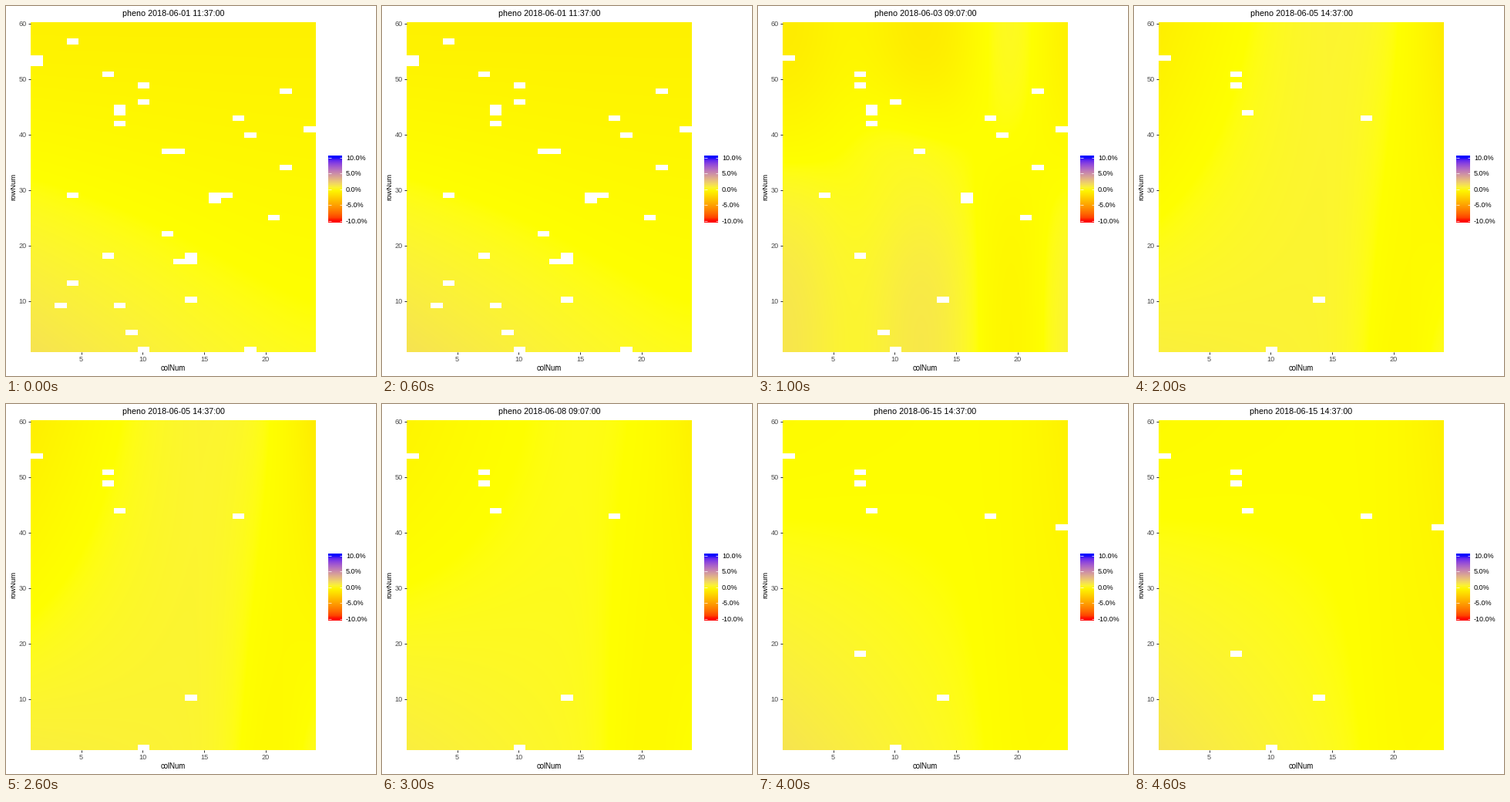
A matplotlib script that plays this animation: 480x480 px, repeating every 5000 ms.

```python
import numpy as np
import matplotlib.pyplot as plt
from matplotlib.animation import FuncAnimation

SIZE, DPI = 480, 100
LEFT, TOP, RIGHT, BOTTOM = 32, 21, 402, 449
COLS, ROWS = 24, 60
LIMIT = 10.5

plt.rcParams["font.family"] = "Liberation Sans"

# Red, yellow and blue in CIELAB; yellow sits at zero.
LAB_STOPS = np.array([[53.24, 80.09, 67.20],
                      [97.14, -21.55, 94.48],
                      [32.30, 79.19, -107.86]])
WHITE = np.array([0.9505, 1.0, 1.089])
XYZ_TO_RGB = np.array([[3.2406, -1.5372, -0.4986],
                       [-0.9689, 1.8758, 0.0415],
                       [0.0557, -0.2040, 1.0570]])


def lab_to_rgb(lab):
    fy = (lab[..., 0] + 16) / 116
    f = np.stack([fy + lab[..., 1] / 500, fy, fy - lab[..., 2] / 200], -1)
    xyz = WHITE * np.where(f > 6 / 29, f ** 3, (f - 4 / 29) * 108 / 841)
    lin = np.clip(xyz @ XYZ_TO_RGB.T, 0, 1)
    return np.clip(np.where(lin > 0.0031308,
                            1.055 * lin ** (1 / 2.4) - 0.055,
                            12.92 * lin), 0, 1)


def colour(percent):
    stops = [-LIMIT, 0, LIMIT]
    return lab_to_rgb(np.stack(
        [np.interp(percent, stops, LAB_STOPS[:, k]) for k in range(3)], -1))


# Pixel centres, and the field position: u runs rightwards, v upwards
X = np.arange(LEFT, RIGHT) + 0.5
Y = np.arange(TOP, BOTTOM) + 0.5
U, V = np.meshgrid((X - LEFT) / (RIGHT - LEFT), (BOTTOM - Y) / (BOTTOM - TOP))
COL_OF = np.floor((X - 32.4) / 15.383).astype(int) + 1
ROW_OF = np.floor((448.78 - Y) / 7.13).astype(int) + 1


def bell(t, centre, width):
    return np.exp(-((t - centre) / width) ** 2 / 2)


def sheet(level, tilt=0, corner=0, left=0, right=0, dip=0):
    """Raised lower left corner, upper sides falling off, dip at lower right."""
    return (level + tilt * V
            + corner * ((1 - U) * (1 - V)) ** 1.5
            - left * V * np.maximum(0, 1 - U / 0.6) ** 1.5
            - right * V * np.maximum(0, (U - 0.6) / 0.4) ** 2.5
            - dip * (1 - V) * bell(U, 0.84, 0.11))


def waves():
    """Ripples across the field that change sign from bottom to top."""
    across = 0.8 + 0.3 * np.cos(4 * np.pi * U) - 0.95 * bell(U, 0.84, 0.13)
    rise = 0.4 * bell(U, 0.45, 0.15) * bell(V, 0.66, 0.12)
    return across * np.cos(np.pi * V ** 1.25) + rise - 0.15 * U


STEPS = [
    ("2018-06-01 11:37:00", sheet(0.15, tilt=-0.95, corner=1.1)),
    ("2018-06-03 09:07:00", waves()),
    ("2018-06-05 14:37:00",
     sheet(0.45, corner=0.25, left=1.4, right=1.6, dip=0.75)),
    ("2018-06-08 09:07:00",
     sheet(0.12, corner=0.65, left=0.7, right=0.9, dip=0.45)),
    ("2018-06-15 14:37:00",
     sheet(-0.1, corner=1.3, left=0.15, right=0.7, dip=0.2)),
]

# Missing plots as (column, row), keyed by the steps that lack them
GAPS = {
    "01234": [(1, 54), (7, 51), (8, 44), (18, 43), (14, 10), (10, 1)],
    "1234": [(7, 49)],
    "014": [(24, 41), (7, 18)],
    "01": [(10, 46), (8, 45), (8, 42), (12, 37), (19, 40), (22, 48), (22, 34),
           (16, 29), (16, 28), (21, 25), (4, 29), (9, 4)],
    "0": [(4, 57), (1, 53), (10, 49), (13, 37), (17, 29), (12, 22), (14, 18),
          (14, 17), (13, 17), (4, 13), (3, 9), (8, 9), (19, 1)],
}


def paint(step):
    rgb = colour(STEPS[step][1])
    for steps, plots in GAPS.items():
        if str(step) in steps:
            for col, row in plots:
                rgb[np.ix_(ROW_OF == row, COL_OF == col)] = 1
    return rgb


fig = plt.figure(figsize=(SIZE / DPI, SIZE / DPI), dpi=DPI, facecolor="white")
ax = fig.add_axes([0, 0, 1, 1])


def label(x, y, text, px, ha="center", color="black", **kw):
    return ax.text(x, y, text, fontsize=px * 72 / DPI, ha=ha, color=color, **kw)


def line(xs, ys, color, px=1.0):
    ax.plot(xs, ys, color=color, lw=px * 72 / DPI, solid_capstyle="butt")


panels = [paint(i) for i in range(len(STEPS))]
panel = ax.imshow(panels[0], extent=(LEFT, RIGHT, BOTTOM, TOP),
                  interpolation="nearest", aspect="auto")

# Axes
GREY, DARK = "#4d4d4d", "#333333"
for n in range(5, 21, 5):
    x = 97.5 + (n - 5) * 15.97
    line([x, x], [BOTTOM, BOTTOM + 3], DARK)
    label(x, 461, str(n), 9.1, color=GREY)
for n in range(10, 61, 10):
    y = 382.5 - (n - 10) * 7.2
    line([LEFT - 3, LEFT], [y, y], DARK)
    label(27, y + 3.2, str(n), 9.1, "right", GREY)
label(217, 473, "colNum", 9.6)
label(9.5, 234.5, "rowNum", 9.5, rotation=90, va="center")

# Colour key
ramp = colour(np.linspace(LIMIT, -LIMIT, 20))[:, None].repeat(2, axis=1)
ax.imshow(ramp, extent=(418, 436, 281, 194), interpolation="bilinear",
          aspect="auto")
for n in range(-10, 11, 5):
    y = 237.8 - n * 4.08
    line([418, 421.5], [y, y], "white", 0.7)
    line([432.5, 436], [y, y], "white", 0.7)
    label(441, y + 3, f"{n:.1f}%", 9, "left")

title = label(217, 13, "", 10.7)
ax.set(xlim=(0, SIZE), ylim=(SIZE, 0))
ax.axis("off")


def update(i):
    title.set_text("pheno " + STEPS[i][0])
    panel.set_data(panels[i])
    return panel, title


anim = FuncAnimation(fig, update, frames=len(STEPS), interval=1000,
                     repeat=True, repeat_delay=0)
plt.show()
```
